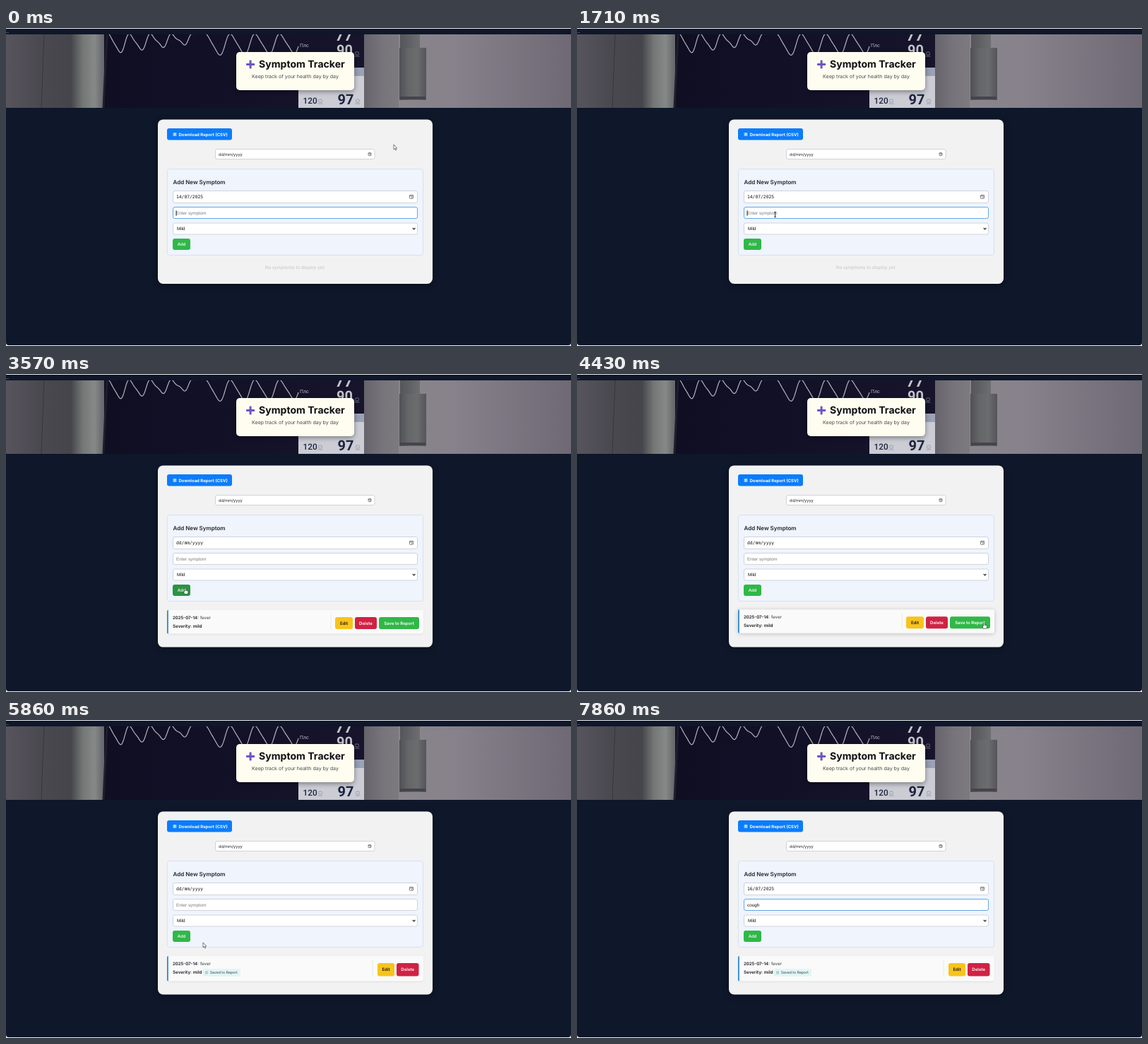
An HTML page with a canvas for the animation above (8000 ms loop, 800 px wide and 450 px high).

```html
<!DOCTYPE html>
<html lang="en">
<head>
<meta charset="utf-8">
<title>Symptom Tracker</title>
<style>
html, body { margin: 0; width: 100%; height: 100%; overflow: hidden; background: #0f172a; }
canvas { display: block; width: 800px; height: 450px; }
</style>
</head>
<body>
<canvas id="stage" width="800" height="450"></canvas>
<script>
const ctx = document.getElementById('stage').getContext('2d');
ctx.textRendering = 'geometricPrecision';

const LOOP = 8000, FPS = 7;
const INTER = 'Inter, sans-serif';
const ARIAL = '"Liberation Sans", sans-serif';
const MONO = '"DejaVu Sans Mono", monospace';
const DIGITS = 'Roboto, sans-serif';
const GREEN = '#30b848', AMBER = '#f8c41b', RED = '#d02244';

// Steps at which the interface changes.
const TYPE_FEVER = 16, ADDED = 24, SAVED = 33, DATED = 48, TYPE_COUGH = 51;

// Hit areas: x, y, width, height.
const ADD = [236, 298, 25, 16];
const SAVE = [528, 344, 57, 17];
const INPUT = [236.5, 253.5, 346, 16];

// The pointer eases between these stops.
const STOPS = [
  { at: 0, x: 549, y: 165 }, { at: 4, x: 430, y: 340 }, { at: 12, x: 280.5, y: 264 },
  { at: 20, x: 786, y: 253 }, { at: 24, x: 253.5, y: 303 }, { at: 25, x: 253.5, y: 303 },
  { at: 28, x: 672, y: 322 }, { at: 31, x: 576, y: 352 }, { at: 33, x: 576, y: 352 },
  { at: 38, x: 634, y: 330 }, { at: 41, x: 279, y: 315 }, { at: 46, x: 573, y: 238 },
  { at: 56, x: 300, y: 262 }
];

const inside = (p, [x, y, w, h]) => p.x > x && p.x < x + w && p.y > y && p.y < y + h;
const smooth = f => f * f * (3 - 2 * f);

function box(x, y, w, h, r, fill, stroke, width = 1) {
  ctx.beginPath();
  ctx.roundRect(x, y, w, h, r);
  if (fill) { ctx.fillStyle = fill; ctx.fill(); }
  if (stroke) { ctx.strokeStyle = stroke; ctx.lineWidth = width; ctx.stroke(); }
}

function text(str, x, y, size, color, weight = 400, family = INTER, align = 'left') {
  ctx.font = `${weight} ${size}px ${family}`;
  ctx.fillStyle = color;
  ctx.textAlign = align;
  ctx.fillText(str, x, y);
}

function shadowed(color, blur, dy, paint) {
  ctx.save();
  ctx.shadowColor = color;
  ctx.shadowBlur = blur;
  ctx.shadowOffsetY = dy;
  paint();
  ctx.restore();
}

function shade(x0, x1, y0, y1, ...colors) {
  const g = ctx.createLinearGradient(x0, 0, x1, 0);
  colors.forEach((c, i) => g.addColorStop(i / (colors.length - 1), c));
  ctx.fillStyle = g;
  ctx.fillRect(x0, y0, x1 - x0, y1 - y0);
}

function line(points, color, width) {
  ctx.beginPath();
  points.forEach(([x, y]) => ctx.lineTo(x, y));
  ctx.strokeStyle = color;
  ctx.lineWidth = width;
  ctx.stroke();
}

// A pulse trace: troughs every `period`, fading by `decay` over its length.
function trace(x0, x1, period, depth, decay) {
  const points = [];
  for (let x = x0; x <= x1; x++) {
    const a = (x - x0) / period * 2 * Math.PI;
    const amp = depth * (1 - decay * (x - x0) / (x1 - x0));
    points.push([x, 9 + amp * (1 - Math.cos(a)) / 2 + 2.5 * Math.sin(2 * a)]);
  }
  line(points, '#b5b3be', 1.2);
}

function banner() {
  ctx.save();
  ctx.beginPath();
  ctx.rect(0, 9, 800, 104);
  ctx.clip();
  shade(0, 94, 9, 113, '#57545d', '#4b4950', '#45444b');
  line([[54, 9], [50, 113]], '#37353e', 1);
  shade(92, 142, 9, 113, '#45464b', '#747775', '#858987', '#5b5c61');
  shade(139, 507, 9, 113, '#100e22', '#131128', '#17142c');
  line([[143, 9], [138, 113]], '#201e2d', 3);
  trace(146, 266, 30, 27, 0.55);
  trace(284, 414, 35, 29, 0.1);

  text('Плс', 416, 27, 7, '#b9b8c0', 400, DIGITS);
  text('77', 466, 18, 22, '#c4c3ca', 700, DIGITS);
  text('90', 468, 38, 20, '#c4c3ca', 700, DIGITS);
  box(414, 56, 93, 60, 0, '#cbccd4');
  box(493, 56, 14, 12, 0, '#9ba3b8');
  text('120', 420.5, 107, 11.8, '#1d2440', 500, DIGITS);
  text('97', 469.5, 108, 20, '#1d2440', 700, DIGITS);
  for (const [x, y] of [[497, 36], [498, 62], [445, 103], [498, 103]]) {
    box(x - 2.5, y - 2, 5, 4, 1.5, null, '#8b90a2', 0.7);
    line([[x - 3.5, y + 4], [x + 3.5, y + 4]], '#8b90a2', 0.7);
  }

  shade(507, 560, 9, 113, '#66636b', '#77747b', '#7d7a80');
  shade(556, 800, 9, 113, '#8a868d', '#86818a', '#7a757f', '#6e6974');
  shade(558, 586, 9, 28, '#55555a', '#6d6e70');
  shade(557, 595, 28, 102, '#505056', '#656668', '#6b6c6e', '#55555a');
  box(558, 97, 36, 4, 0, '#45444b');
  ctx.restore();
}

function title() {
  shadowed('rgba(0,0,0,.4)', 7, 2, () => box(326, 34, 167, 54, 5, '#fefdf0'));
  box(344.6, 45.4, 3, 12, 1, '#6c55c4');
  box(340, 49.9, 12.2, 3, 1, '#6c55c4');
  text('Symptom Tracker', 358.1, 56, 14.07, '#101014', 700);
  text('Keep track of your health day by day', 409.5, 71, 7.08, '#4a4a50', 400, INTER, 'center');
}

function calendar(x, y, s) {
  const half = s / 2;
  box(x - half, y - half, s, s, 0.6, null, '#555', 0.7);
  line([[x - half, y - half * 0.4], [x + half, y - half * 0.4]], '#555', 0.8);
  box(x, y + half * 0.1, half * 0.5, half * 0.5, 0, '#666');
}

function field([x, y, w, h], stroke = '#d0d3d9') {
  box(x, y, w, h, 2.5, '#fff', stroke);
}

function button(label, [x, y, w, h], fill, color = '#fff', weight = 600) {
  box(x, y, w, h, 3, fill);
  text(label, x + w / 2, y + h / 2 + 2.2, 6.05, color, weight, INTER, 'center');
}

// Two letters appear per step once typing has begun.
function typed(n) {
  const [word, begin] = n < ADDED ? ['fever', TYPE_FEVER] : ['cough', TYPE_COUGH];
  return word.slice(0, Math.max(0, (n - begin) * 2 + 1));
}

// The caret stays lit during typing and blinks otherwise.
function caretOn(n) {
  const since = n < 12 ? n : n < TYPE_FEVER ? n - 12 : n < ADDED ? n - TYPE_FEVER : n - TYPE_COUGH;
  return since >= 0 && since % 7 < 4;
}

function symptomInput(n) {
  const focus = n < ADDED || n >= TYPE_COUGH, value = typed(n);
  field(INPUT, focus ? '#63a8e4' : undefined);
  text(value || 'Enter symptom', 241, 264.2, 6.33, value ? '#111' : '#7b7b7b', 400, ARIAL);
  if (focus && caretOn(n)) {
    const w = value ? ctx.measureText(value).width : 0;
    box(240.6 + w, 258.3, 0.9, 7.4, 0, '#111');
  }
}

function form(n, p) {
  box(228.5, 199.5, 362, 122, 3, '#eff4fd', '#d8e1f0');
  text('Add New Symptom', 236.5, 221.4, 8, '#23262d', 600);

  field([236.5, 230.5, 346, 17]);
  const date = n < ADDED ? '14/07/2025' : n < DATED ? 'dd/mm/yyyy' : '16/07/2025';
  text(date, 241, 241.3, 6.33, '#151515', 400, MONO);
  calendar(574, 238.8, 5);

  symptomInput(n);

  field([236.5, 276, 346, 16]);
  text('Mild', 242, 286.2, 6.33, '#111', 400, ARIAL);
  line([[575.8, 283], [577.6, 284.9], [579.4, 283]], '#222', 1.1);
  button('Add', ADD, inside(p, ADD) ? '#2c9441' : GREEN, '#fff', 500);
}

function entry(n, p) {
  const saved = n >= SAVED, h = saved ? 35.5 : 33.5, area = [228, 334, 363, h];
  const hover = inside(p, area);
  ctx.save();
  if (hover) ctx.translate(0, -0.8);
  shadowed(`rgba(0,0,0,${hover ? 0.2 : 0.08})`, hover ? 6 : 3, 1, () => box(...area, 3, '#fafafa'));
  box(228, 334, 1.8, h, [3, 0, 0, 3], '#2f86d6');
  text('2025-07-14:', 236, 346.9, 6.1, '#1b1d22', 600);
  text('fever', 275, 346.9, 6.15, '#33363c');
  text('Severity: mild', 236, saved ? 359.4 : 358.9, 6.25, '#1b1d22', 600);
  box(saved ? 518.7 : 459.7, 340, 0.8, h - 12, 0, '#e4e5e8');

  if (saved) {
    box(278.5, 352, 53.5, 10.8, 2, '#e2f5f4');
    box(282, 355.2, 4, 4.4, 0.5, '#b5cfd2');
    text('Saved to Report', 288.8, 359.2, 5.15, '#2b454b');
    button('Edit', [526, 344, 24, 18.5], AMBER, '#1d1a10');
    button('Delete', [553, 344, 31.5, 18.5], RED);
  } else {
    button('Edit', [466, 344, 25, 17], AMBER, '#1d1a10');
    button('Delete', [494, 344, 31, 17], RED);
    button('Save to Report', SAVE, GREEN);
  }
  ctx.restore();
}

function card(n, p) {
  const bottom = n < ADDED ? 362 : n < SAVED ? 386.6 : 388.4;
  shadowed('rgba(0,0,0,.35)', 8, 2, () => box(215, 129.4, 389, bottom - 129.4, 7.5, '#f2f2f2'));
  box(228, 142, 92, 16.5, 3, '#0c7cfb');
  box(236.5, 148, 5, 5, 0.8, '#8cc3fb');
  line([[239, 148.7], [239, 152]], '#fff', 0.8);
  text('Download Report (CSV)', 244.5, 152.7, 6, '#fff', 700);
  field([296.5, 171.5, 225.5, 14]);
  text('dd/mm/yyyy', 301, 180.8, 5.7, '#222');
  calendar(515, 178.6, 4);
  form(n, p);
  if (n < ADDED) {
    text('No symptoms to display yet.', 409.5, 341, 6.4, '#c2c2c2', 'italic 400', INTER, 'center');
  } else entry(n, p);
}

function pointerAt(n) {
  const i = Math.max(1, STOPS.findIndex(s => s.at >= n));
  const a = STOPS[i - 1], b = STOPS[i];
  const f = smooth((n - a.at) / (b.at - a.at));
  return { x: a.x + (b.x - a.x) * f, y: a.y + (b.y - a.y) * f };
}

function arrow() {
  ctx.beginPath();
  ctx.moveTo(0, 0);
  ctx.lineTo(0, 6.9);
  ctx.lineTo(1.5, 5.6);
  ctx.lineTo(2.8, 8);
  ctx.lineTo(3.7, 7.5);
  ctx.lineTo(2.7, 5.2);
  ctx.lineTo(4.7, 5);
  ctx.closePath();
  ctx.fillStyle = '#fff';
  ctx.fill();
  ctx.strokeStyle = '#222';
  ctx.lineWidth = 0.6;
  ctx.stroke();
}

function hand() {
  box(-1.5, 3.2, 5.8, 5.2, 1.8, '#fff', '#222', 0.6);
  box(-0.3, 0, 1.6, 5.5, 0.8, '#fff', '#222', 0.5);
  box(-0.2, 4, 3.8, 3.5, 1, '#fff');
}

function beam() {
  line([[0, -3.4], [0, 3.4]], '#111', 0.9);
  for (const y of [-3.6, 3.6]) line([[-1.5, y], [1.5, y]], '#111', 0.7);
}

function pointer(n, p) {
  const typing = (n >= TYPE_FEVER && n < TYPE_FEVER + 3) || n >= TYPE_COUGH;
  if (typing) return;
  const saving = n >= ADDED && n < SAVED && inside(p, SAVE);
  ctx.save();
  ctx.translate(p.x, p.y);
  if (inside(p, INPUT)) beam();
  else if (saving || inside(p, ADD)) hand();
  else arrow();
  ctx.restore();
}

function draw(t) {
  const n = Math.floor((t + 5) * FPS / 1000) % 56, p = pointerAt(n);
  box(0, 0, 800, 450, 0, '#eceef1');
  box(0, 1, 800, 448, [0, 0, 4, 4], '#0f172a');
  text('..', 0, 7, 7, '#e6e8ec', 500);
  banner();
  title();
  card(n, p);
  pointer(n, p);
}

const start = performance.now();
function tick() {
  draw((performance.now() - start) % LOOP);
  requestAnimationFrame(tick);
}
tick();
</script>
</body>
</html>
```
